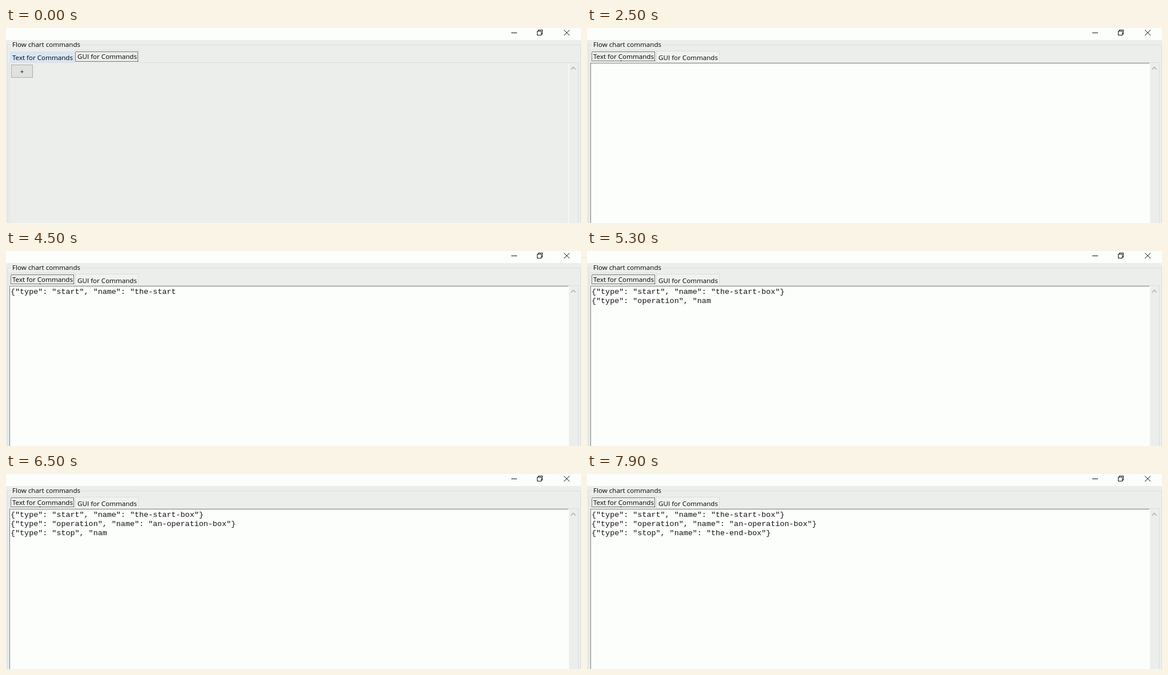
Recreate the animation shown at these times as an HTML page. Size 1006 by 341 pixels, loop 8 s.

```html
<!DOCTYPE html>
<html lang="en">
<head>
<meta charset="utf-8">
<title>Flow chart commands</title>
<style>
  html, body { margin: 0; height: 100%; overflow: hidden; background: #eceeec; }
  svg { display: block; }
  text { font: 11.62px "Open Sans", "Noto Sans", sans-serif; fill: #000; }
  .code text { font: 13.4px "Liberation Mono", monospace; fill: #111; }
  rect, .line { shape-rendering: crispEdges; }
  .line { fill: none; stroke: #dcdedc; }
  .icon { fill: none; stroke: #111; }
  .focus { fill: none; stroke: #000; stroke-dasharray: 1 1; }
</style>
</head>
<body>
<svg width="1006" height="341" viewBox="0 0 1006 341">
  <rect width="1006" height="341" fill="#eceeec"/>
  <rect width="1006" height="21" fill="#fcfefc"/>
  <path class="icon line" style="stroke:#111" d="M884 8.5H894M929.5 5.5H936.5V12.5H929.5ZM931.5 5V3.5H938.5V10.5H937"/>
  <path class="icon" d="M976 3.5L986 13M986 3.5L976 13"/>

  <path class="line" d="M8 29.5H2.5V341M132 29.5H1005.5V341"/>
  <text x="11" y="33">Flow chart commands</text>
  <path class="line" d="M5.5 341V60.5H1001.5V341"/>

  <g id="gui">
    <rect x="7" y="41" width="113" height="19" fill="#d8e6f4"/>
    <rect x="120" y="39" width="112" height="22" fill="#eceeec"/>
    <path class="line" d="M119.5 60V38.5H232.5V60"/>
    <rect class="focus" x="121.5" y="41.5" width="109" height="17"/>
    <text x="11" y="56">Text for Commands</text>
    <text x="125" y="54">GUI for Commands</text>
    <rect x="9.5" y="64.5" width="37" height="22" fill="#e0e2e0" stroke="#acaeac"/>
    <text x="28" y="80" text-anchor="middle">+</text>
    <path class="line" style="stroke:#fcfefc" d="M984.5 61V341"/>
  </g>

  <g id="editor">
    <rect x="122" y="41" width="109" height="19" fill="#f0f2f0"/>
    <path class="line" d="M122 40.5H231.5V60"/>
    <rect x="6" y="39" width="115" height="22" fill="#eceeec"/>
    <path class="line" d="M5.5 60V38.5H121.5V60"/>
    <rect class="focus" x="8.5" y="41.5" width="110" height="16"/>
    <text x="11" y="54">Text for Commands</text>
    <text x="125" y="56">GUI for Commands</text>
    <rect x="6" y="61" width="979" height="280" fill="#fcfefc"/>
    <path class="line" style="stroke:#848684" d="M6.5 341V61.5H984"/>
    <g class="code">
      <text x="8" y="75"></text>
      <text x="8" y="91"></text>
      <text x="8" y="107"></text>
    </g>
  </g>

  <path d="M988.5 72.5L992.5 68.5L996.5 72.5" fill="none" stroke="#b0b2b0" stroke-width="1.6"/>
</svg>
<script>
const LOOP = 8000, TAB_SWITCH = 2500, STEP = 100;
const script = [
  '{"type": "start", "name": "the-start-box"}',
  '{"type": "operation", "name": "an-operation-box"}',
  '{"type": "stop", "name": "the-end-box"}'
].join('\n');
// Typing pace: [time in ms, characters typed]
const pace = [[3800, 8], [4500, 36], [5300, 69], [6500, 114], [6950, script.length]];

const gui = document.getElementById('gui');
const editor = document.getElementById('editor');
const rows = document.querySelectorAll('.code text');

function typedCount(t) {
  if (t < pace[0][0]) return 0;
  const i = pace.findIndex(([time]) => time > t);
  if (i < 0) return script.length;
  const [t0, n0] = pace[i - 1], [t1, n1] = pace[i];
  return Math.round(n0 + (n1 - n0) * (t - t0) / (t1 - t0));
}

function draw(now) {
  const t = Math.floor(now % LOOP / STEP) * STEP;
  const editing = t >= TAB_SWITCH;
  gui.style.display = editing ? 'none' : '';
  editor.style.display = editing ? '' : 'none';
  const lines = script.slice(0, typedCount(t)).split('\n');
  rows.forEach((row, i) => { row.textContent = lines[i] || ''; });
  requestAnimationFrame(draw);
}
draw(performance.now());
</script>
</body>
</html>
```
